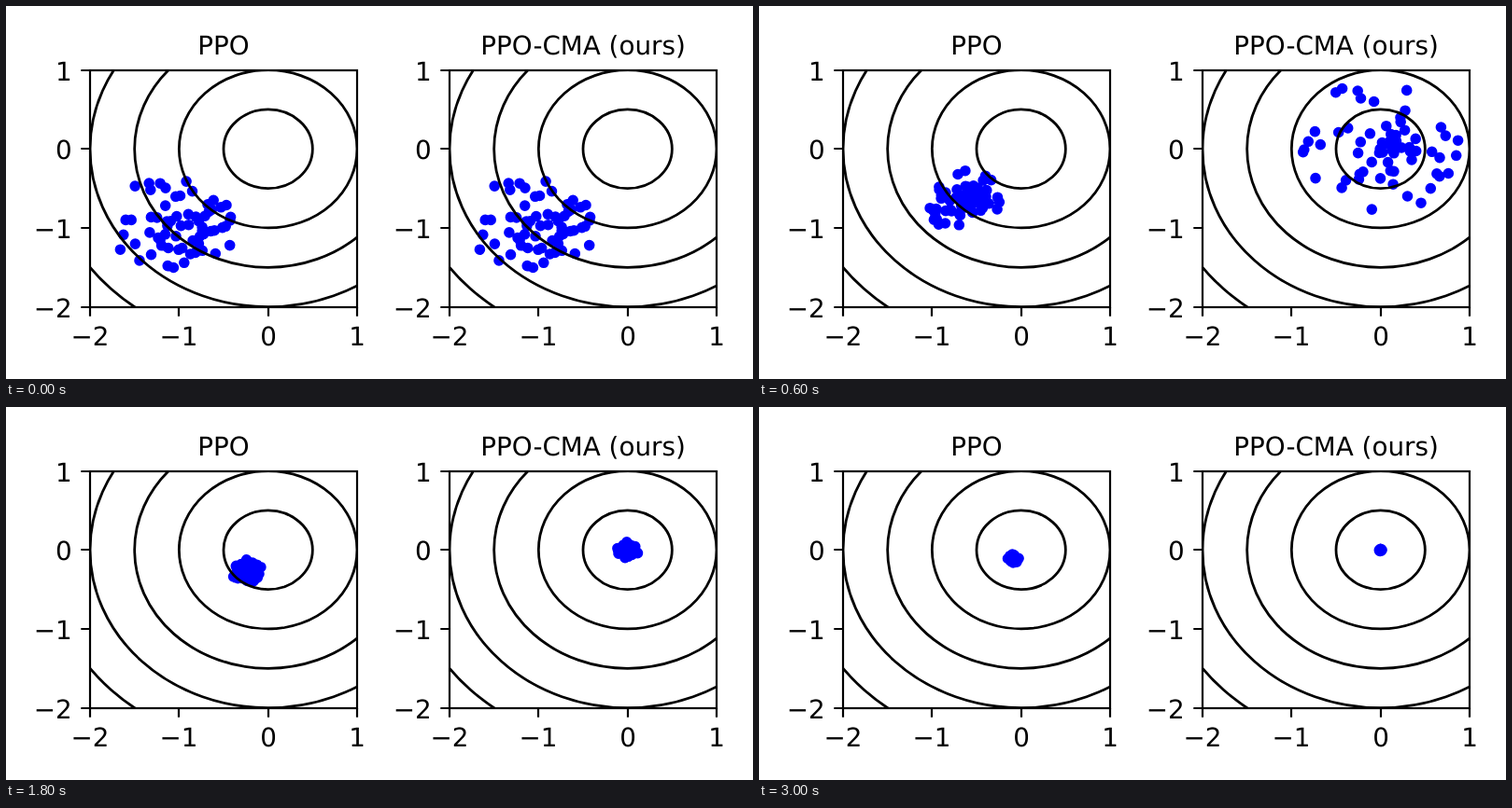
Write an HTML page that moves like this. It is 800 px wide and 400 px high and loops after 3200 ms.

```html
<!DOCTYPE html>
<html lang="en">
<head>
<meta charset="utf-8">
<title>PPO and PPO-CMA sampling</title>
<style>
  html, body { margin: 0; width: 100%; height: 100%; overflow: hidden; background: #fff; }
  svg { display: block; width: 800px; height: 400px; }
  text { font: 27.78px "DejaVu Sans", sans-serif; text-rendering: geometricPrecision; }
  .ring { fill: none; stroke: #000; stroke-width: 2.78; }
  .axis { fill: none; stroke: #000; stroke-width: 2.2; }
  .dots {
    fill: none; stroke: #00f; stroke-width: 11.6; stroke-linecap: round;
    visibility: hidden; animation: show 3200ms step-end infinite;
  }
  @keyframes show {
    0% { visibility: visible; }
    6.25%, 100% { visibility: hidden; }
  }
</style>
</head>
<body>
<svg id="stage" viewBox="0 0 800 400">
  <clipPath id="left"><rect x="90" y="69" width="286" height="254"/></clipPath>
  <clipPath id="right"><rect x="475" y="69" width="286" height="254"/></clipPath>
</svg>
<script>
const stage = document.getElementById('stage');
const UNIT_X = 286 / 3, UNIT_Y = 254 / 3;
const STEPS = 16, STEP_MS = 200, DOTS = 64;

function add(parent, tag, attrs, text) {
  const el = document.createElementNS('http://www.w3.org/2000/svg', tag);
  for (const key in attrs) el.setAttribute(key, attrs[key]);
  if (text) el.textContent = text;
  return parent.appendChild(el);
}

function random(seed) {
  return () => {
    seed = (seed + 0x6D2B79F5) | 0;
    let t = Math.imul(seed ^ (seed >>> 15), 1 | seed);
    t = (t + Math.imul(t ^ (t >>> 7), 61 | t)) ^ t;
    return ((t ^ (t >>> 14)) >>> 0) / 4294967296;
  };
}

// Rescales values to span -1 to 1.
function spanUnit(values) {
  const min = Math.min(...values), max = Math.max(...values);
  return values.map(v => 2 * (v - min) / (max - min) - 1);
}

// Normally distributed dots around a mean, reaching as far as the spread.
function cloud(seed, { x, y, spread }) {
  const rand = random(seed), xs = [], ys = [];
  while (xs.length < DOTS) {
    const r = Math.sqrt(-2 * Math.log(1 - rand())), a = 2 * Math.PI * rand();
    if (r > 2.4) continue;
    xs.push(r * Math.cos(a));
    ys.push(r * Math.sin(a));
  }
  const ux = spanUnit(xs), uy = spanUnit(ys);
  return ux.map((u, i) => [x + u * spread, y + uy[i] * spread * 0.88]);
}

// Mean and spread both shrink steadily.
const ppo = step => ({
  x: -1.04 * Math.exp(-0.165 * step),
  y: -0.957 * Math.exp(-0.145 * step),
  spread: 0.62 * Math.exp(-0.155 * step)
});

// The spread widens while the mean travels, then collapses on the optimum.
const cma = step => {
  const left = Math.max(0, 1 - step / 2.9);
  return {
    x: -1.04 * left,
    y: -0.957 * left,
    spread: Math.min(0.62 + 0.25 * step, 0.87) * Math.exp(-0.34 * Math.max(0, step - 3))
  };
};

function panel(x0, title, clip, seed, policy) {
  const toX = v => x0 + (v + 2) * UNIT_X;
  const toY = v => 68.65 + (1 - v) * UNIT_Y;
  const plot = add(stage, 'g', { 'clip-path': `url(#${clip})` });

  for (let step = 0; step < STEPS; step++) {
    const points = cloud(step ? seed + step : 5, policy(step));
    add(plot, 'path', {
      class: 'dots',
      style: `animation-delay: ${(step - STEPS) * STEP_MS}ms`,
      d: points.map(([x, y]) => `M${toX(x).toFixed(1)} ${toY(y).toFixed(1)}h0`).join('')
    });
  }
  for (let r = 0.5; r <= 2.5; r += 0.5) {
    add(plot, 'ellipse', { class: 'ring', cx: toX(0), cy: toY(0), rx: r * UNIT_X, ry: r * UNIT_Y });
  }

  add(stage, 'rect', { class: 'axis', x: x0, y: 69, width: 286, height: 254 });
  for (let v = -2; v <= 1; v++) {
    const label = String(v).replace('-', '\u2212');
    const x = Math.round(toX(v)), y = Math.round(toY(v));
    add(stage, 'path', { class: 'axis', d: `M${x} 323v9.7M${x0} ${y}h-9.7` });
    add(stage, 'text', { x, y: 364, 'text-anchor': 'middle' }, label);
    add(stage, 'text', { x: x0 - 19.4, y: y + 10.5, 'text-anchor': 'end' }, label);
  }
  add(stage, 'text', { x: x0 + 143, y: 52.3, 'text-anchor': 'middle' }, title);
}

panel(90, 'PPO', 'left', 100, ppo);
panel(475, 'PPO-CMA (ours)', 'right', 200, cma);
</script>
</body>
</html>
```
